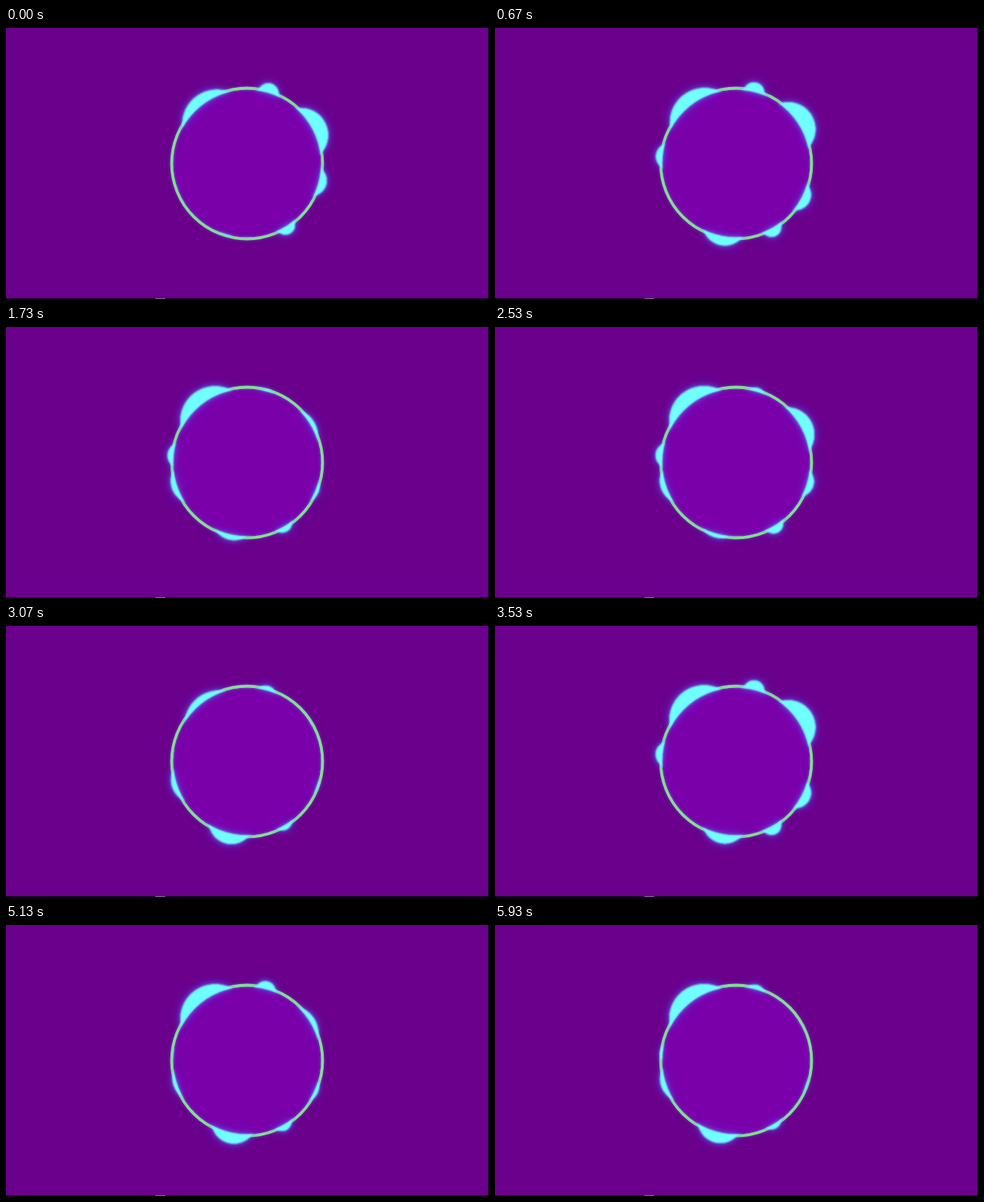
These frames come from a looping animation (637 by 358 pixels, 5.99 s). An HTML page:

```html
<!DOCTYPE html>
<html lang="en">
<head>
<meta charset="utf-8">
<title>Pulsing ring</title>
<style>
html, body { margin: 0; width: 100%; height: 100%; overflow: hidden; background: #6a008c; }
svg { display: block; width: 637px; height: 358px; }
#ring { fill: none; stroke: #86e090; stroke-width: 3.8; filter: blur(.6px) drop-shadow(0 0 2px rgba(110, 110, 210, .6)); }
#glow { filter: blur(.8px) drop-shadow(0 0 3px rgba(110, 130, 255, .5)) drop-shadow(0 0 6px rgba(90, 80, 255, .6)); }
#blobs { fill: #70ffff; filter: url(#goo); }
</style>
</head>
<body>
<svg viewBox="0 0 637 358">
  <filter id="goo" filterUnits="userSpaceOnUse" x="180" y="40" width="280" height="280" color-interpolation-filters="sRGB">
    <feGaussianBlur stdDeviation="2.5"/>
    <feColorMatrix values="1 0 0 0 0  0 1 0 0 0  0 0 1 0 0  0 0 0 14 -6.3"/>
  </filter>
  <mask id="outside" maskUnits="userSpaceOnUse" x="0" y="0" width="637" height="358">
    <rect width="637" height="358" fill="#fff"/>
    <circle cx="318" cy="179" r="97.6" fill="#000"/>
  </mask>
  <rect width="637" height="358" fill="#6a008c"/>
  <circle cx="318" cy="179" r="99" fill="#7a00aa"/>
  <circle id="ring" cx="318" cy="179" r="99.5"/>
  <g id="glow"><g mask="url(#outside)"><g id="blobs"></g></g></g>
  <rect y="357" width="637" height="1" fill="#100018"/>
  <rect x="197" y="357" width="13" height="1" fill="#8a6a98"/>
  <rect x="636" width="1" height="358" fill="#100018"/>
</svg>
<script>
const LOOP = 5990, STEP = 200 / 3, LAST = 89;
const CX = 318, CY = 179, BEAT = 10.75; // steps per beat

// Each blob sits at an angle (degrees), reaches `far` from the centre,
// and sinks by `dip` once per period, deepest at step `low`.
const blobs = [
  { angle: -127.5, r: 46, far: 69.5, dip: 16, low: 65, period: 17, sharp: 4 },
  { angle: -74.5, sway: -1.5, r: 14, far: 96.5, dip: 10, low: 4.5 },
  { angle: -30.5, sway: -3, r: 36, far: 83, dip: 21, low: 3.2 },
  { angle: 21, sway: 7, r: 20.5, far: 89, dip: 10, low: 3.2 },
  { angle: 59.5, sway: 1.5, r: 13, far: 96.5, dip: 5.5, low: 3.2 },
  { angle: 104, sway: -3.5, r: 30, far: 82, dip: 13, low: 0, period: BEAT * 4 / 7, sharp: 1 },
  { angle: 161, r: 30, far: 75, dip: 8, low: 10 },
  { angle: -174, r: 17, far: 90, dip: 9, low: 0, period: 15.2 }
];

function addCircle(cx, cy, r) {
  const el = document.createElementNS('http://www.w3.org/2000/svg', 'circle');
  el.setAttribute('cx', cx);
  el.setAttribute('cy', cy);
  el.setAttribute('r', r);
  document.getElementById('blobs').append(el);
  return el;
}

addCircle(CX, CY, 97.6); // hidden core the blobs melt into
for (const b of blobs) b.el = addCircle(CX, CY, b.r);

const wave = (step, peak, period) => Math.cos(2 * Math.PI * (step - peak) / period);

function pose(step) {
  const swing = wave(step, 9, BEAT * 2);
  for (const { el, angle, sway = 0, far, dip, low, period = BEAT, sharp = 2 } of blobs) {
    const sink = ((1 + wave(step, low, period)) / 2) ** sharp;
    const dist = far - dip * sink;
    const a = (angle + sway * swing) * Math.PI / 180;
    el.setAttribute('cx', CX + dist * Math.cos(a));
    el.setAttribute('cy', CY + dist * Math.sin(a));
  }
}

const start = performance.now();
function draw() {
  const t = Math.max(0, performance.now() - start) % LOOP;
  pose(Math.min(LAST, Math.floor((t + 4) / STEP)));
  requestAnimationFrame(draw);
}
draw();
</script>
</body>
</html>
```
